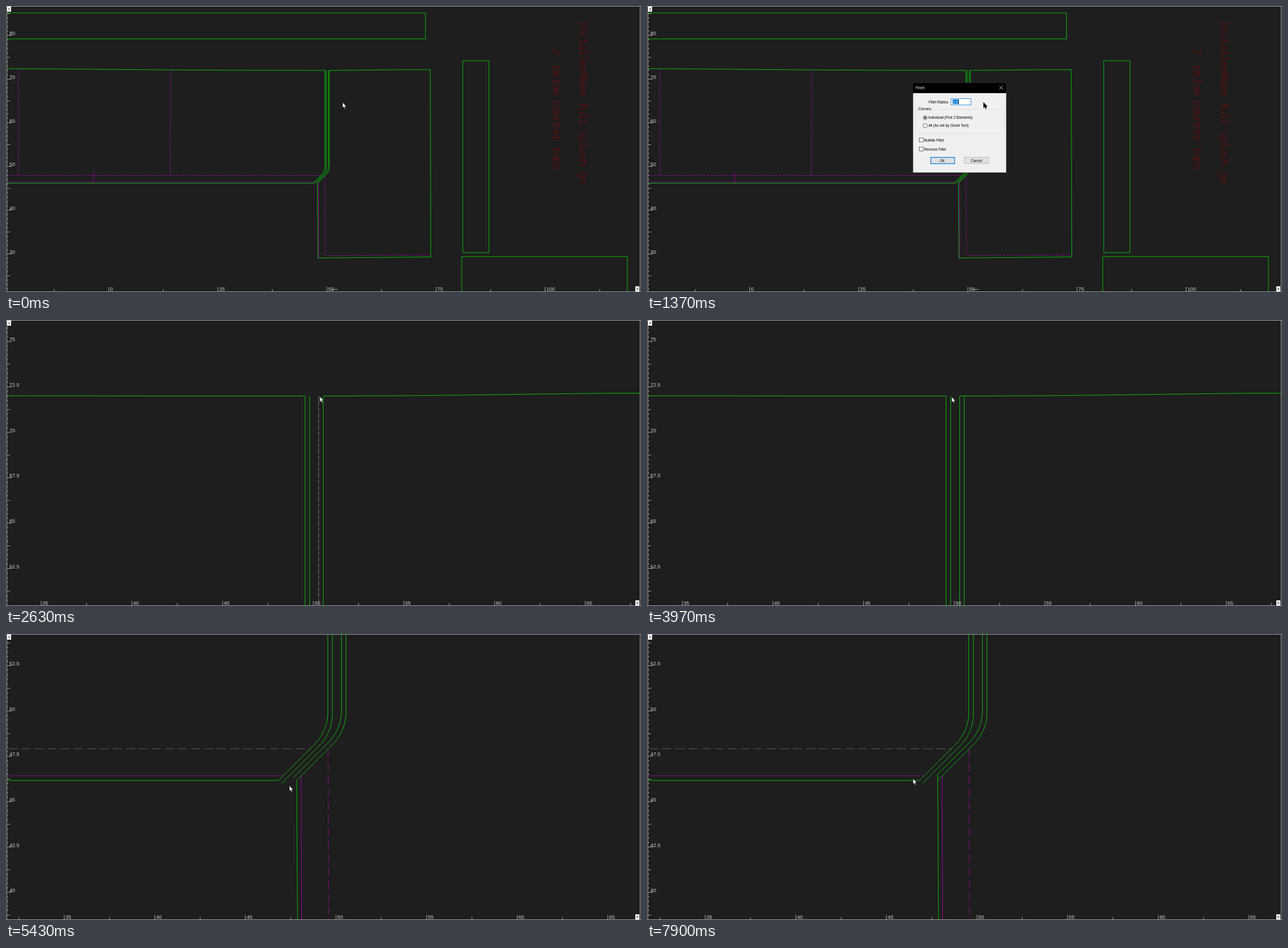
Recreate the animation shown at these times as an HTML page. Size 1116 by 502 pixels, loop 8000 ms.

```html
<!DOCTYPE html>
<html lang="en">
<head>
<meta charset="utf-8">
<title>Fillet tool</title>
<style>
html, body { margin: 0; width: 100%; height: 100%; overflow: hidden; background: #1e1e1e; }
svg { display: block; width: 1116px; height: 502px; }
.crisp { shape-rendering: crispEdges; }
.line { fill: none; stroke-width: .7; }
.ruler path { fill: none; stroke: #b8b8b8; stroke-width: .9; }
.ruler text { font: 9px "Liberation Sans", sans-serif; fill: #cfcfcf; }
.note { font: 100 20px "Noto Sans Mono", monospace; fill: #780a0a; stroke: #1e1e1e; stroke-width: .7; letter-spacing: -1.85px; }
#dialog text { font: 6.3px "Liberation Sans", sans-serif; fill: #000; }
#dialog .title { font: 7.3px "Open Sans", sans-serif; fill: #fff; }
#dialog .mid { text-anchor: middle; }
</style>
</head>
<body>
<svg viewBox="0 0 1116 502" xmlns="http://www.w3.org/2000/svg">
  <clipPath id="stage"><rect x="2" y="1" width="1112" height="500"/></clipPath>
  <rect width="1116" height="502" fill="#1e1e1e"/>
  <g clip-path="url(#stage)">
    <g id="notes"></g>
    <g id="plan"></g>
  </g>
  <g class="ruler">
    <path d="M0 .5H1116M1.5 0V502M0 501.5H1116M1114.5 0V502"/>
    <g id="ticks"></g>
    <path id="dash" d="M573 497.5H583"/>
    <rect class="crisp" x="2" y="1" width="7" height="9" fill="#fff"/>
    <rect class="crisp" x="1106" y="492" width="7" height="9" fill="#fff"/>
    <path d="M4 3.5l1.5 2l1.5-2M5.5 5.5v2.5M1108 494.5l3 4M1111 494.5l-3 4" style="stroke:#111"/>
  </g>
  <g id="dialog">
    <rect x="467.4" y="134.8" width="164" height="157.6" fill="#f0f0f0" stroke="#444" stroke-width=".6"/>
    <rect x="467.2" y="134.6" width="164.4" height="18.4" fill="#000"/>
    <text class="title" x="472" y="146.3">Fillet</text>
    <path d="M619.5 140.5l6 6m0-6l-6 6" stroke="#fff" stroke-width=".8"/>
    <text x="495" y="171">Fillet Radius</text>
    <rect x="534.3" y="162.7" width="35" height="11" fill="#fff" stroke="#0078d7" stroke-width=".8"/>
    <rect id="sel" x="537" y="164" width="10.5" height="8" fill="#0078d7"/>
    <text id="value" x="537.5" y="170.7"></text>
    <rect id="caret" y="164" width=".8" height="8" fill="#111"/>
    <rect x="472.5" y="181.5" width="155" height="42" fill="none" stroke="#dcdcdc" stroke-width=".8"/>
    <rect x="476" y="178" width="25" height="7" fill="#f0f0f0"/>
    <text x="477" y="183.4">Corners</text>
    <g fill="#fff" stroke="#333" stroke-width=".7">
      <circle cx="489" cy="196" r="3.7"/>
      <circle cx="489" cy="210" r="3.7"/>
      <rect x="478.4" y="231.6" width="7" height="7"/>
      <rect x="478.4" y="247.6" width="7" height="7"/>
    </g>
    <circle cx="489" cy="196" r="1.9" fill="#222"/>
    <text x="494.5" y="198.3">Individual (Pick 2 Elements)</text>
    <text x="494.5" y="212.3">All (As set by Ghost Tool)</text>
    <text x="487" y="237.6">Bubble Fillet</text>
    <text x="487" y="253.6">Reverse Fillet</text>
    <rect x="498.7" y="265.7" width="42" height="11" fill="#e1e1e1" stroke="#0078d7" stroke-width="1.2"/>
    <rect x="557.6" y="265.6" width="43" height="11" fill="#e1e1e1" stroke="#adadad" stroke-width=".7"/>
    <text class="mid" x="519" y="273.5">OK</text>
    <text class="mid" x="579" y="273.5">Cancel</text>
  </g>
  <path id="cursor" d="M0 0V9.4L2.1 7.5L3.6 11L5.1 10.3L3.7 7H6.5Z" stroke-width=".6"/>
</svg>
<script>
const $ = id => document.getElementById(id);
const GREEN = '#00ff00', PURPLE = '#c400c4';
const FRONT = 46.17, BACK = 72, SEAM = 50.05;
const items = [];

function make(tag, cls, parent) {
  const el = document.createElementNS('http://www.w3.org/2000/svg', tag);
  el.setAttribute('class', cls);
  $(parent).append(el);
  return el;
}

// Drawing elements hold points in plan units.
function add(color, pts, opt = {}) {
  items.push({ el: make('path', 'line', 'plan'), color, pts, from: 0, ...opt });
}

const box = (l, r, t, b) => [[l, t], [r, t], [r, b], [l, b], [l, t]];

// splash strips
add(GREEN, box(-40, 72.6, 85.15, 79.2));
add(GREEN, box(81.13, 87.13, 74.2, 30.28));
add(GREEN, box(80.9, 118.85, 29.4, 10));

// left plate
add(PURPLE, [[-20.67, 72.4], [-20.67, 47.92]], { dash: true });
add(PURPLE, [[14.2, 72.12], [14.1, 47.92]], { dash: true });
add(PURPLE, [[-30, 47.92], [48.6, 47.92]], { dash: true, near: '#777077' });
add(PURPLE, [[-30, 46.43], [47.05, 46.43]], { near: '#901090' });
add(PURPLE, [[-3.45, 48.9], [-3.45, 46.43]]);
add(GREEN, [[-30, 72.45], [28, 72.02], [45.9, BACK]]);
add(GREEN, [[45.9, BACK], [49.55, BACK]], { name: 'topLeft' });
add(GREEN, [[-30, FRONT], [46.82, FRONT]], { name: 'bottom' });

// right plate
add(PURPLE, [[48.08, 46.43], [48.13, 29.1]]);
add(PURPLE, [[49.56, 47.9], [49.62, 29.6], [73.8, 29.75]], { dash: true });
add(GREEN, [[50.56, BACK], [55.65, 72.02]], { name: 'topRight' });
add(GREEN, [[55.65, 72.02], [66, 72.15], [73.68, 72.17], [73.8, 29.3], [47.93, 29.08]]);
add(GREEN, [[47.83, FRONT], [47.93, 29.08]], { name: 'side' });

// Seam: four lines, each an upright, a rounded bend and a diagonal y = x - c.
// The two inner diagonals miss the front edge by a little.
const RADIUS = 2.5, SHORT = .17;
for (let i = 0; i < 4; i++) {
  const inner = i === 1 || i === 2, side = i < 2 ? -1 : 1;
  const x = SEAM + side * (inner ? .25 : .5);
  const c = .653 + i / 3;
  const top = x - c + RADIUS * Math.tan(Math.PI / 8);
  const bend = [];
  for (let k = 0; k <= 14; k++) {
    const a = k / 14 * Math.PI / 4;
    bend.push([x - RADIUS + RADIUS * Math.cos(a), top - RADIUS * Math.sin(a)]);
  }
  const y = FRONT + (inner ? side * SHORT : 0);
  add(GREEN, [[x, BACK], [x, top]], { name: 'upright' + i });
  add(GREEN, bend);
  add(GREEN, [bend[14], [y + c, y]], { name: 'diag' + i });
}

// Pointer script: item under the pointer, tick of arrival, tick of the click, plan point.
const picks = [
  ['', 0, 49, 53.59, 64.66],
  ['upright2', 72, 87, 50.36, 71.97],
  ['topRight', 90, 99, 55.46, 72],
  ['upright1', 110, 119, 49.86, 71.95],
  ['topLeft', 124, 132, 45.92, 72],
  ['', 161, 163, 47.43, 45.88],
  ['diag1', 168, 175, 47.49, 46.46],
  ['diag2', 188, 193, 48.24, 46.93],
  ['side', 204, 211, 47.85, 45.61],
  ['diag1', 216, 225, 47.87, 46.87],
  ['bottom', 237, 237, 46.47, 46.27]
];

// corners closed by every second click
const close = (from, ...pts) => add(GREEN, pts, { from });
close(99, [50.3, BACK], [50.56, BACK]);
close(132, [49.55, BACK], [49.8, BACK]);
close(211, [47.83, 46.51], [47.83, FRONT]);
const trimmed = items.find(it => it.name === 'diag2');

const notes = [['InstallerMake full splash go', 107.9, 83.4], ['2" below counter tops', 101.76, 77.1]].map(([text, x, y]) => {
  const el = make('text', 'note', 'notes');
  el.textContent = text;
  return { el, x, y };
});

// Zooms: first and last tick, ease-out power, then the view reached.
const home = { s: 7.67, x: 564, y: 113 };
const zooms = [
  [55, 72, 1, { s: 31.87, x: 540, y: 133.4 }],
  [138, 143, 1, { s: 6.55, x: 508, y: 133 }],
  [143, 163, 3.7, { s: 31.85, x: 580, y: -565.6 }]
];

const mix = (a, b, p) => a + (b - a) * p;
const clamp = v => Math.max(0, Math.min(1, v));
const show = (el, on) => el.setAttribute('visibility', on ? 'visible' : 'hidden');

// Zooming keeps one point of the screen fixed, so offsets follow the scale.
function viewAt(n) {
  let v = home;
  for (const [from, to, power, next] of zooms) {
    if (n <= from) break;
    const p = 1 - Math.pow(1 - clamp((n - from) / (to - from)), power);
    const s = v.s * Math.pow(next.s / v.s, p);
    const q = (s - v.s) / (next.s - v.s);
    v = { s, x: mix(v.x, next.x, q), y: mix(v.y, next.y, q) };
  }
  const { s, x, y } = v;
  return { s, X: a => x + (a - 50) * s, Y: b => y + (BACK - b) * s, left: 50 - x / s, top: BACK + y / s };
}

const stepFor = (s, min) => [1, 2.5, 5, 10, 25, 50].find(v => v * s >= min) || 50;

function drawRulers(v) {
  let d = '', labels = '';
  const label = (x, y, t) => labels += `<text x="${x.toFixed(1)}" y="${y.toFixed(1)}">${t}</text>`;
  const sx = stepFor(v.s, 150), sy = stepFor(v.s, 50);
  for (let k = Math.ceil(v.left / sx * 2); ; k++) {
    const x = v.X(k * sx / 2);
    if (x > 1104) break;
    if (x < 3) continue;
    d += `M${x} 501V${k % 2 ? 497 : 493}`;
    if (k % 2 === 0) label(x + 2.2, 500, k * sx / 2);
  }
  for (let k = Math.floor(v.top / sy * 10); ; k--) {
    const y = v.Y(k * sy / 10);
    if (y > 499) break;
    if (y < 11) continue;
    d += `M2 ${y}H${k % 10 === 0 ? 10 : k % 5 === 0 ? 7 : 4}`;
    if (k % 10 === 0) label(6, y - .5, k * sy / 10);
  }
  $('ticks').innerHTML = `<path d="${d}"/>${labels}`;
}

function drawPlan(n, v) {
  const lit = picks.filter(p => n >= p[1] - 3 && n < p[2]).map(p => p[0]);
  const y = FRONT + (n >= 211 ? 2 : 1) * SHORT;
  trimmed.pts[1] = [y + .653 + 2 / 3, y];
  for (const it of items) {
    const on = it.name && lit.includes(it.name);
    const set = (key, value) => it.el.setAttribute(key, value);
    show(it.el, n >= it.from);
    set('d', 'M' + it.pts.map(p => v.X(p[0]).toFixed(2) + ' ' + v.Y(p[1]).toFixed(2)).join('L'));
    set('stroke', on ? '#b0b0b0' : it.near && v.s > 20 ? it.near : it.color);
    set('stroke-dasharray', on ? '6 1.5 1.5 1.5' : it.dash ? `${v.s * .5} ${v.s * .22}` : 'none');
  }
  for (const t of notes)
    t.el.setAttribute('transform', `translate(${v.X(t.x)} ${v.Y(t.y)}) rotate(90) scale(${v.s / home.s})`);
}

function drawDialog(n) {
  const open = n < 48 ? clamp((n - 10) / 9) : clamp((53 - n) / 5);
  const typed = n >= 42, k = .92 + .08 * open;
  show($('dialog'), open > 0);
  $('dialog').setAttribute('opacity', open);
  $('dialog').setAttribute('transform', `translate(549.5 214) scale(${k}) translate(-549.5 -214)`);
  $('value').textContent = typed ? '0' : '2.5';
  $('value').style.fill = typed ? '#111' : '#fff';
  $('sel').setAttribute('width', typed ? 0 : 10.5);
  $('caret').setAttribute('x', typed ? 541 : 547);
  $('caret').setAttribute('opacity', n < 26 || n >= 41 ? 1 : 0);
}

function pointerAt(n) {
  const spot = ([, arrive, , x, y]) => {
    const v = viewAt(arrive);
    return [v.X(x), v.Y(y)];
  };
  const left = picks.filter(p => p[2] <= n).length;
  const next = picks[Math.min(left, picks.length - 1)];
  const prev = picks[Math.max(0, Math.min(left, picks.length - 1) - 1)];
  const p = next[1] > prev[2] ? clamp((n - prev[2]) / (next[1] - prev[2])) : 1;
  const a = spot(prev), b = spot(next), e = p * p * (3 - 2 * p);
  return [mix(a[0], b[0], e), mix(a[1], b[1], e)];
}

function drawCursor(n) {
  const c = $('cursor'), dark = n >= 14 && n < 50;
  c.setAttribute('transform', `translate(${pointerAt(n)})`);
  c.setAttribute('fill', dark ? '#000' : '#fff');
  c.setAttribute('stroke', dark ? '#000' : '#111');
  // hidden while typing and while zooming out and in
  show(c, !(n >= 43 && n < 50) && !(n >= 139 && n < 161));
}

function render(n) {
  const v = viewAt(n);
  drawRulers(v);
  drawPlan(n, v);
  drawDialog(n);
  drawCursor(n);
  show($('dash'), n < 56);
}

// The screen refreshes thirty times a second.
let last = -1;
const start = performance.now();
function loop() {
  const n = Math.floor((performance.now() - start) % 8000 * .03 + .1) % 240;
  if (n !== last) render(last = n);
  requestAnimationFrame(loop);
}
loop();
</script>
</body>
</html>
```
